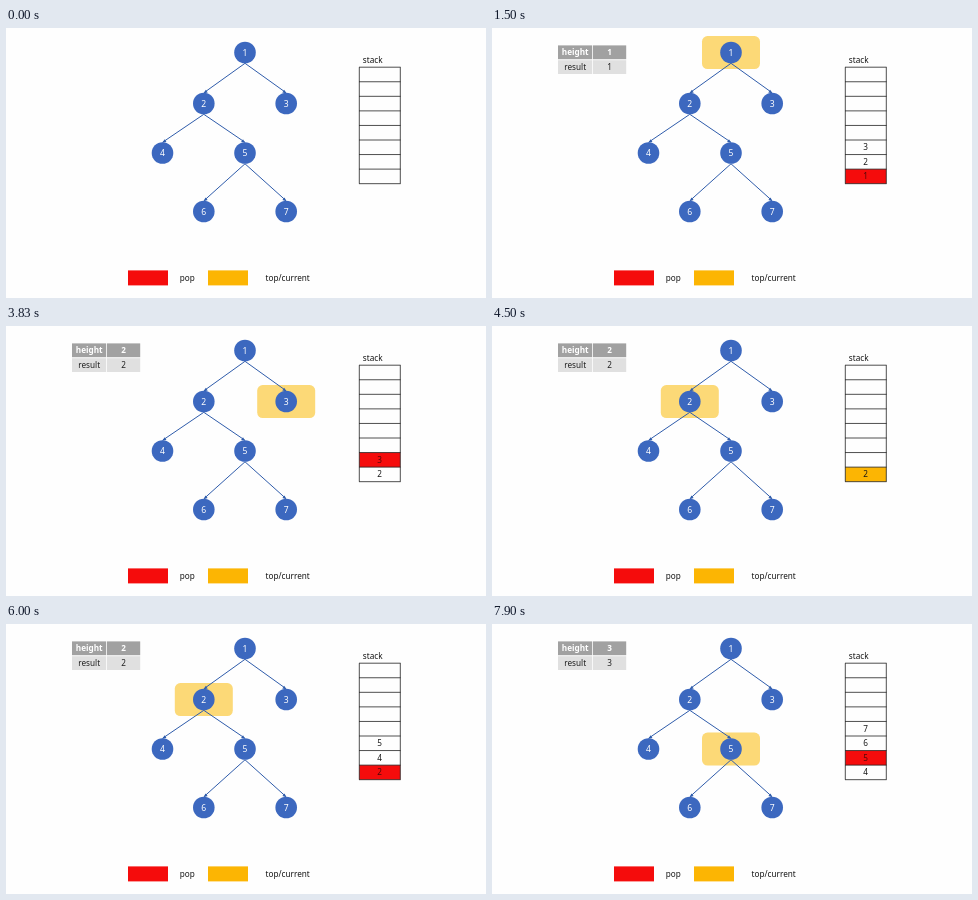
Animation, 480 px wide and 270 px high, one loop 8000 ms. Source, as an HTML page:

```html
<!DOCTYPE html>
<html lang="en">
<head>
<meta charset="utf-8">
<style>
  html, body { margin: 0; width: 100%; height: 100%; overflow: hidden; background: #fefefe; }
  svg { display: block; width: 100%; height: 100%; font: 8.2px "Noto Sans", "Open Sans", sans-serif; }
</style>
</head>
<body>
<svg id="stage" viewBox="0 0 480 270"></svg>
<script>
const LOOP = 8000, FIRST_STEP = 470, STEP = 1000;
const RED = '#f50c0c', ORANGE = '#fcb503', BLUE = '#3c68bf', LINE = '#2f5cab';

const nodes = {
  1: [239, 24.5], 2: [197.8, 75.5], 3: [280.2, 75.5], 4: [156.5, 125],
  5: [239, 125], 6: [197.8, 183.5], 7: [280.2, 183.5]
};
const edges = [[1, 2], [1, 3], [2, 4], [2, 5], [5, 6], [5, 7]];

// Each state: current node, height (and result), stack from the bottom, row and colour of the marked cell
const states = [
  { stack: [] },
  { node: 1, height: 1, stack: [1], row: 0, mark: ORANGE },
  { node: 1, height: 1, stack: [1, 2, 3], row: 0, mark: RED },
  { node: 3, height: 2, stack: [2, 3], row: 1, mark: ORANGE },
  { node: 3, height: 2, stack: [2, 3], row: 1, mark: RED },
  { node: 2, height: 2, stack: [2], row: 0, mark: ORANGE },
  { node: 2, height: 2, stack: [2, 4, 5], row: 0, mark: RED },
  { node: 5, height: 3, stack: [4, 5], row: 1, mark: ORANGE },
  { node: 5, height: 3, stack: [4, 5, 6, 7], row: 1, mark: RED }
];

const rect = (x, y, w, h, fill, extra = '') =>
  `<rect x="${x}" y="${y}" width="${w}" height="${h}" fill="${fill}" ${extra}/>`;
const text = (x, y, content, fill = '#151515', extra = '') =>
  `<text x="${x}" y="${y}" fill="${fill}" ${extra}>${content}</text>`;
const centered = (x, y, content, fill, extra = '') =>
  text(x, y, content, fill, `text-anchor="middle" ${extra}`);

function drawEdge([from, to]) {
  const [x1, y1] = nodes[from], [x2, y2] = nodes[to];
  const angle = Math.atan2(y2 - y1 - 21.5, x2 - x1) * 180 / Math.PI;
  return `<path d="M${x1} ${y1 + 10.8}L${x2} ${y2 - 10.7}" stroke="${LINE}" stroke-width="1"/>
    <path d="M0 0L-3.6 -1.7V1.7Z" fill="${LINE}" transform="translate(${x2} ${y2 - 10.3}) rotate(${angle})"/>`;
}

function drawTree(current) {
  let out = '';
  if (current) {
    const [x, y] = nodes[current];
    out += rect(x - 29, y - 16.4, 58, 33, '#fcd977', 'rx="5.5"');
  }
  out += edges.map(drawEdge).join('');
  for (const [label, [x, y]] of Object.entries(nodes)) {
    out += `<circle cx="${x}" cy="${y}" r="10.8" fill="${BLUE}"/>` +
      centered(x, y + 3.1, label, '#fff', 'font-size="8.6"');
  }
  return out;
}

function drawTable(height) {
  if (!height) return '';
  const row = (y, h, fill, label, color, extra) =>
    rect(66, y, 34.2, h, fill) + rect(101, y, 33.2, h, fill) +
    centered(83.2, y + 9.9, label, color, extra) + centered(117.5, y + 9.9, height, color, extra);
  return row(17.4, 13.8, '#a1a1a1', 'height', '#fff', 'font-weight="700"') +
    row(32.2, 13.8, '#e0e0e0', 'result', '#202020');
}

function drawStack({ stack, row, mark }) {
  const top = 39.2, cell = 14.56, rowTop = i => top + (7 - i) * cell;
  let out = text(356.8, 35, 'stack');
  if (mark) out += rect(353.3, rowTop(row), 41, cell, mark);
  let path = `M353.3 ${top}v${8 * cell}M394.3 ${top}v${8 * cell}`;
  for (let i = 0; i <= 8; i++) path += `M353 ${top + i * cell}h41.6`;
  out += `<path d="${path}" stroke="#222" stroke-width=".8" fill="none"/>`;
  stack.forEach((label, i) => {
    out += centered(373.7, rowTop(i) + 10.3, label, i === row && mark === RED ? '#500808' : '#181818');
  });
  return out;
}

const legend = rect(122, 242.4, 40, 15, RED) + text(173.8, 253.4, 'pop') +
  rect(202, 242.4, 40, 15, ORANGE) + text(259.6, 253.4, 'top/current');

const stage = document.getElementById('stage');
let shown = -1;

function render() {
  const time = performance.now() % LOOP;
  const index = Math.max(0, Math.floor((time - FIRST_STEP) / STEP) + 1);
  if (index !== shown) {
    const state = states[index];
    stage.innerHTML = drawTree(state.node) + drawTable(state.height) + drawStack(state) + legend;
    shown = index;
  }
  requestAnimationFrame(render);
}
render();
</script>
</body>
</html>
```
